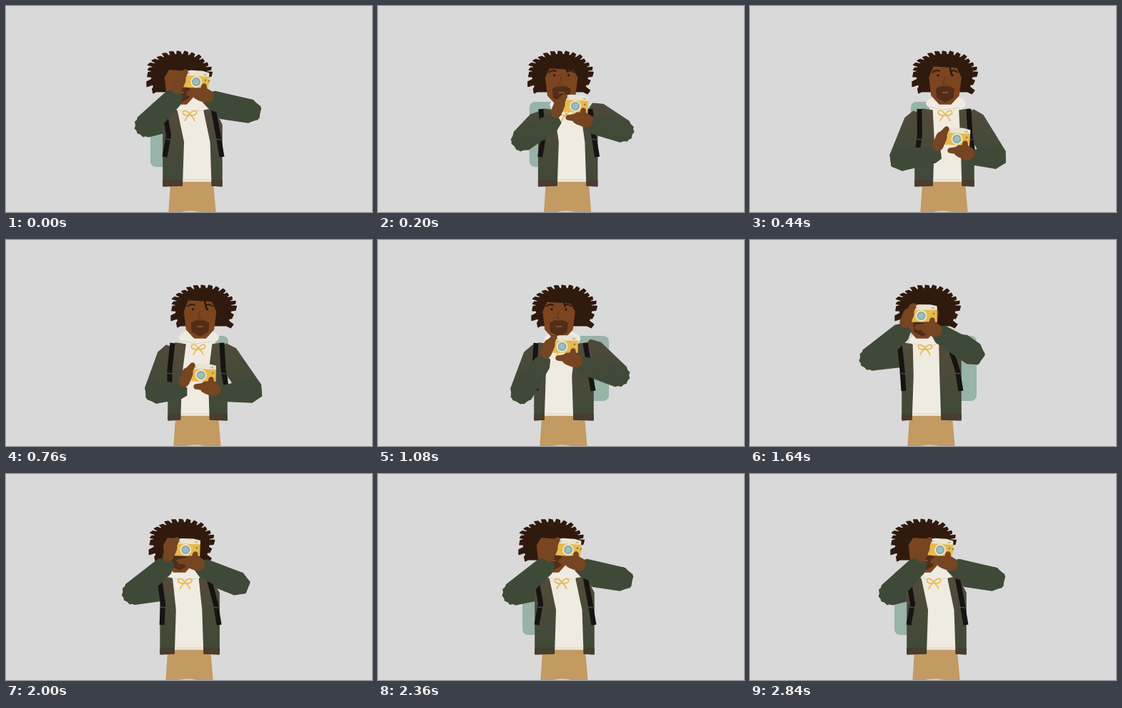
These frames come from a looping animation (512x288 px, 2.88 s). An HTML page with a canvas:

```html
<!DOCTYPE html>
<html lang="en">
<head>
<meta charset="utf-8">
<title>Photographer</title>
<style>
html, body { margin: 0; width: 100%; height: 100%; overflow: hidden; background: #d9d9d9; }
canvas { display: block; width: 512px; height: 288px; }
</style>
</head>
<body>
<canvas id="stage"></canvas>
<script>
const LOOP = 2880, STEP = 40;
const canvas = document.getElementById('stage');
const ctx = canvas.getContext('2d');
const ratio = window.devicePixelRatio || 1;
canvas.width = 512 * ratio;
canvas.height = 288 * ratio;

const GREEN = '#3e4937', BROWN = '#524a3b', HEM = '#483d2f';
const SKIN = '#7c4520', HAND = '#764522', HAIR = '#301a0d', BEARD = '#522d17', BLACK = '#161412';

// hem, neck and head are x positions; turn runs from -1 (left) to 1 (right).
// Hands, sleeves, clothes and straps follow from these few points.
const right = { hem: 261, neck: 258, head: 242, turn: .9, cam: [266, 104], elbowL: [196, 167], elbowR: [341, 147] };
const front = { hem: 272, neck: 274, head: 272, turn: .6, cam: [290, 184], elbowL: [211, 214], elbowR: [343, 211] };
const shifted = { hem: 268, neck: 270, head: 276, turn: -.5, cam: [276, 187], elbowL: [210, 212], elbowR: [343, 211] };
const lifting = { hem: 260, neck: 258, head: 260, turn: -1, cam: [262, 147], elbowL: [201, 213], elbowR: [336, 189] };
const left = { hem: 254, neck: 246, head: 248, turn: -1, cam: [244, 104], elbowL: [169, 166], elbowR: [312, 159] };
const settling = { ...right, elbowL: [190, 167] };

const easeIn = u => u * u;
const easeOut = u => 1 - (1 - u) * (1 - u);
const easeBoth = u => u * u * (3 - 2 * u);

// time, pose, easing towards the next key
const keys = [
  [0, right, easeBoth], [20, right, easeBoth], [420, front, easeBoth], [520, front, easeBoth],
  [740, shifted, easeBoth], [860, shifted, easeIn], [1080, lifting, easeOut], [1360, left, easeBoth],
  [1740, left, easeBoth], [2300, settling, easeBoth], [2360, settling, easeBoth],
  [2800, right, easeBoth], [LOOP, right, easeBoth]
];

const mix = (a, b, u) => Array.isArray(a) ? a.map((n, i) => mix(n, b[i], u)) : a + (b - a) * u;

function poseAt(time) {
  const k = keys.findIndex((key, i) => time < keys[i + 1][0]);
  const [start, from, ease] = keys[k], [end, to] = keys[k + 1];
  const u = ease((time - start) / (end - start));
  const pose = {};
  for (const name in from) pose[name] = mix(from[name], to[name], u);
  return pose;
}

function trace(points) {
  ctx.beginPath();
  for (const [x, y] of points) ctx.lineTo(x, y);
}

function polygon(points, color) {
  trace(points);
  ctx.closePath();
  ctx.fillStyle = ctx.strokeStyle = color;
  ctx.lineWidth = 1.5;
  ctx.fill();
  ctx.stroke();
}

function line(points, color, width) {
  trace(points);
  ctx.strokeStyle = color;
  ctx.lineWidth = width;
  ctx.stroke();
}

function oval(x, y, rx, ry, color) {
  ctx.beginPath();
  ctx.ellipse(x, y, rx, ry, 0, 0, 7);
  ctx.fillStyle = color;
  ctx.fill();
}

const disc = (x, y, r, color) => oval(x, y, r, r, color);

// Tapered segment; few facets give the angular sleeve ends.
function limb([x1, y1], r1, [x2, y2], r2, color, facets = 3) {
  const angle = Math.atan2(y2 - y1, x2 - x1), points = [];
  const cap = (x, y, r, start) => {
    for (let i = 0; i <= facets; i++) {
      const a = start + Math.PI * i / facets;
      points.push([x + r * Math.cos(a), y + r * Math.sin(a)]);
    }
  };
  cap(x1, y1, r1, angle + Math.PI / 2);
  cap(x2, y2, r2, angle - Math.PI / 2);
  polygon(points, color);
}

function cloth(warmth, top, bottom) {
  const g = ctx.createLinearGradient(0, top, 0, bottom);
  g.addColorStop(0, `color-mix(in srgb, ${BROWN} ${warmth * 100}%, ${GREEN})`);
  g.addColorStop(1, GREEN);
  return g;
}

let seed = 7;
const random = () => (seed = seed * 16807 % 2147483647) / 2147483647;

// Blunt locks around the head, hanging lower at both sides.
const locks = [];
const LOCKS = 19;
for (let i = 0; i < LOCKS; i++) {
  const angle = Math.PI * (.84 + 1.32 * i / (LOCKS - 1));
  const reach = .93 + .11 * random();
  for (const [offset, radius] of [[-.08, .84], [-.06, reach], [.05, reach - .03], [.08, .84]]) {
    const a = angle + offset, s = Math.sin(a);
    locks.push([46 * radius * Math.cos(a), (s > 0 ? 58 : 30) * radius * s]);
  }
}

function panel(p, side, fill) {
  const hemX = p.hem + side * 41, inner = p.hem + 7 * p.turn + side * 21;
  polygon([[p.neck + side * 19, 146], [p.neck + side * 33, 144], [hemX, 166], [hemX, 251],
    [inner, 251], [inner - side * 2, 190]], fill);
  polygon([[hemX, 244], [hemX, 252], [inner, 251], [inner, 244]], HEM);
}

function strap(top, mid, bottom) {
  line([[top, 144], [mid, 181], [bottom, 211]], BLACK, 7);
  line([[mid - 4, 186], [mid + 4, 187]], '#4b4a44', 1.5);
}

function hood(x, y, rx) {
  oval(x, y, rx, 11, '#efebe2');
  polygon([[x - rx * .8, y + 5], [x + rx * .8, y + 5], [x, y + 12]], '#efebe2');
  line([[x - rx * .8, y + 5], [x - 4, y + 9], [x + rx * .7, y + 6]], '#d8d3c6', 1);
}

function bow(x, y) {
  ctx.beginPath();
  for (const side of [-1, 1]) {
    ctx.moveTo(x, y);
    ctx.bezierCurveTo(x + side * 4, y - 8, x + side * 12, y - 7, x + side * 9, y - 1);
    ctx.quadraticCurveTo(x + side * 5, y + 2, x, y);
    ctx.quadraticCurveTo(x + side * 5, y + 3, x + side * 7, y + 9);
  }
  ctx.strokeStyle = '#e6b94f';
  ctx.lineWidth = 1.7;
  ctx.stroke();
}

function head(p, lift) {
  const x = p.head + 5 * p.turn - 2, y = 105, top = -20 + 5 * lift;
  polygon(locks.map(([dx, dy]) => [p.head + dx, 93 + dy]), HAIR);

  const jaw = side => [[x + side * 22, y - 5], [x + side * 19, y + 20], [x + side * 8, y + 32]];
  polygon([[x - 16, y + top], [x + 16, y + top + 2], ...jaw(1), ...jaw(-1).reverse()], SKIN);
  polygon([[x - 12, y + 11], [x - 6, y + 8], [x + 6, y + 8], [x + 12, y + 11],
    [x + 11, y + 23], [x, y + 29], [x - 11, y + 23]], BEARD);
  line([[x - 4, y + 16], [x + 4, y + 16]], '#805036', 2);
  line([[x + 6, y - 21], [x + 9, y - 9 - 5 * lift]], HAIR, 2.5);

  // The raised camera hides the eyes.
  if (p.cam[1] < 125) return;
  for (const side of [-1, 1]) {
    disc(x + side * 10, y - 8, 1.4, BLACK);
    line([[x + side * 18, y - 12], [x + side * 13, y - 15], [x + side * 7, y - 14]], HAIR, 2);
  }
  line([[x, y - 6], [x - 3, y + 4], [x + 3, y + 5]], '#64371a', 1.3);
}

function camera([x, y], turn) {
  const lens = -2 + 2.5 * turn;
  ctx.save();
  ctx.translate(x, y);
  ctx.rotate((2 + 2 * turn) * Math.PI / 180);
  polygon([[-17, -7], [17, -7], [17, 10], [-17, 10]], '#e8b94c');
  polygon([[-17, -11], [-8, -13], [8, -13], [17, -11], [17, -7], [-17, -7]], '#e9e3d1');
  for (const side of [-1, 1]) line([[side * 14, -9], [side * 10, -9]], '#b9b5a4', 2);
  disc(13, -1, 1.3, '#9a7430');
  disc(lens, 2, 8, '#eee5c8');
  disc(lens, 2, 6, '#83a9a8');
  disc(lens, 2, 4, '#9fbfbb');
  ctx.restore();
}

function draw(time) {
  const p = poseAt(time);
  const lift = (187 - p.cam[1]) / 83, warmth = 1 - .9 * lift * lift;
  const grip = (dx, dy) => [p.cam[0] + dx, p.cam[1] + dy];
  ctx.setTransform(ratio, 0, 0, ratio, 0, 0);
  ctx.lineJoin = 'round';
  ctx.fillStyle = '#d9d9d9';
  ctx.fillRect(0, 0, 512, 288);

  ctx.beginPath();
  ctx.roundRect(p.hem - 40 * p.turn - 23, 134, 46, 91, 8);
  ctx.fillStyle = '#98b3a7';
  ctx.fill();

  polygon([[p.hem - 30, 244], [p.hem + 28, 244], [p.hem + 32, 290], [p.hem - 33, 290]], '#c39a62');
  oval(p.hem - 3, 289, 13, 2.5, '#ecd4a6');
  const middle = p.hem + 7 * p.turn;
  polygon([[p.neck - 22, 141], [p.neck + 22, 141], [middle + 22, 245], [middle - 22, 245]], '#f0ebe0');
  line([[middle - 21, 243], [middle + 21, 243]], '#dcd3c1', 1);

  const sleeve = cloth(warmth, 145, 212);
  const shoulderR = 142 + (p.elbowR[1] - 146) * .28;
  limb([p.hem - 41, 162], 15, p.elbowL, 16, sleeve);
  limb([p.hem + 41, shoulderR], 15, p.elbowR, 16, sleeve);
  const jacket = cloth(1, 150, 250);
  panel(p, -1, jacket);
  panel(p, 1, jacket);
  strap(p.neck - 37, p.hem - 37 + 4 * p.turn, p.hem - 39);
  strap(p.neck + 32, p.hem + 36, p.hem + 41);

  hood(p.neck, 136 + 4 * lift, 28 - 6 * lift);
  bow(p.neck - 1, 152);
  head(p, lift);

  const forearm = cloth(warmth * .3, 150, 230);
  limb(p.elbowL, 16, grip(-32, 25), 10 + 3 * lift, forearm);
  limb(p.elbowR, 16, grip(23, 28), 10 + 3 * lift, forearm);
  camera(p.cam, p.turn);

  limb(grip(-27, 11), 7, grip(-22, -1), 7, HAND, 6);
  limb(grip(-21, -3), 5, grip(-15, -12), 3, HAND, 6);
  limb(grip(15, 22), 9, grip(4, 19), 8, HAND, 6);
  limb(grip(4, 18), 5, grip(-10, 18), 3, HAND, 6);
  limb(grip(10, 18), 5, grip(11, 8), 3, HAND, 6);
}

function tick() {
  const time = performance.now() % LOOP;
  draw(Math.floor(time / STEP) * STEP);
  requestAnimationFrame(tick);
}
tick();
</script>
</body>
</html>
```
